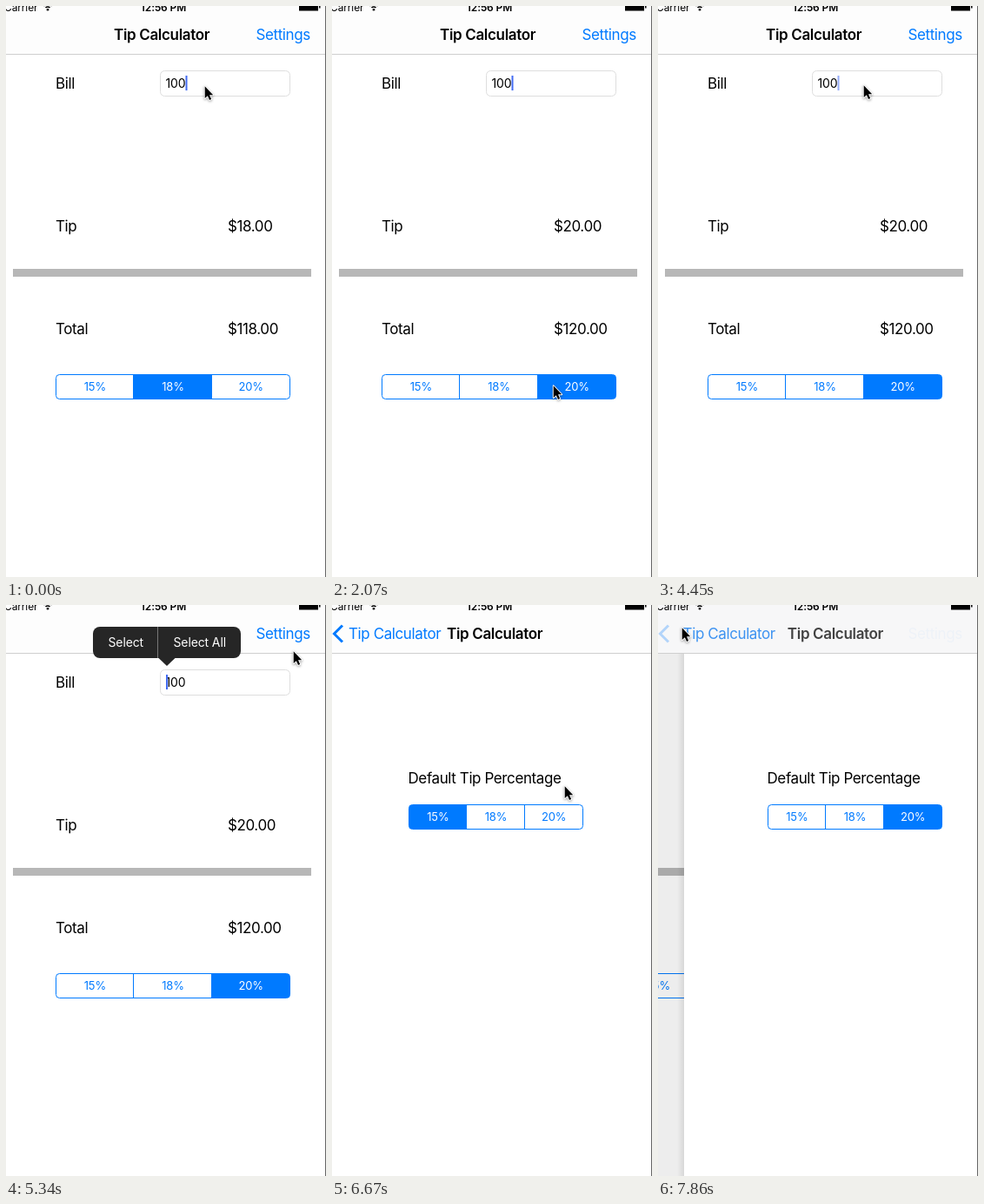
These frames come from a looping animation (368x656 px, 8 s). An HTML page with a canvas:

```html
<!DOCTYPE html>
<html lang="en">
<head>
<meta charset="utf-8">
<title>Tip Calculator</title>
<style>
html, body { margin: 0; width: 100%; height: 100%; overflow: hidden; background: #fff; }
canvas { display: block; width: 368px; height: 656px; }
</style>
</head>
<body>
<canvas></canvas>
<script>
const WIDTH = 368, HEIGHT = 656, LOOP = 8000;
const SCREEN_LEFT = -8, SCREEN_WIDTH = 375;
const TICK_START = 285, TICK = 148.3;
const BLUE = '#007aff';
const RATES = [15, 18, 20];

// Pointer path: [tick, x, y]
const POINTER = [
  [-1, 229, 92], [5, 106, 434], [7, 104, 435], [11, 255, 436], [14, 255, 436],
  [18, 322, 20], [19, 318, 37], [20, 318, 37], [22, 272, 83], [23, 272, 83],
  [25, 237, 91], [28, 237, 91], [29, 198, 91], [30, 163, 91], [32, 163, 91],
  [34, 331, 53], [35, 327, 40], [36, 326, 36], [40, 326, 36], [43, 268, 208],
  [45, 255, 240], [47, 69, 70], [49, 28, 26], [51, 28, 26]
];

const canvas = document.querySelector('canvas');
const ctx = canvas.getContext('2d');
const ratio = window.devicePixelRatio || 1;
canvas.width = WIDTH * ratio;
canvas.height = HEIGHT * ratio;

const clamp = v => Math.max(0, Math.min(1, v));

function rect(x, y, w, h, color) {
  ctx.fillStyle = color;
  ctx.fillRect(x, y, w, h);
}

function polyline(points) {
  ctx.beginPath();
  points.forEach(([x, y]) => ctx.lineTo(x, y));
}

function roundRect(x, y, w, h, r) {
  ctx.beginPath();
  ctx.roundRect(x, y, w, h, r);
}

function text(str, x, y, { size = 17, weight = 400, color = '#000', align = 'left', alpha = 1 } = {}) {
  ctx.save();
  ctx.globalAlpha *= alpha;
  ctx.font = `${weight} ${size}px Inter, Roboto, sans-serif`;
  ctx.letterSpacing = size < 17 ? '-0.12px' : weight > 400 ? '-0.33px' : '-0.4px';
  ctx.textAlign = align;
  ctx.fillStyle = color;
  ctx.fillText(str, x, y);
  ctx.restore();
}

function pointerAt(tick) {
  const i = POINTER.findIndex(p => p[0] >= tick);
  const [t1, x1, y1] = POINTER[i];
  if (i === 0) return [x1, y1];
  const [t0, x0, y0] = POINTER[i - 1];
  const f = (tick - t0) / (t1 - t0);
  return [x0 + (x1 - x0) * f, y0 + (y1 - y0) * f];
}

// How far the settings page still is from its place: 1 = away, 0 = covering.
function settingsDistance(time) {
  if (time < 5790) return 1;
  if (time < 7837.5) {
    const d = Math.exp(-(time - 5790) / 100);
    return d < 0.02 ? 0 : d;
  }
  return 1 - Math.exp(-(time - 7837.5) / 100);
}

function caretAt(tick, time) {
  const x = tick < 29 ? 206.5 : tick < 30 ? 199 : 184;
  if (tick >= 29) return { x, alpha: 1 };
  const phase = (time + 620) % 1000;
  const alpha = phase < 440 ? clamp(1 - phase / 130) : clamp((phase - 440) / 120);
  return { x, alpha };
}

function segments(x, y, w, selected) {
  const h = 28;
  const part = w / 3;
  const divider = i => Math.round(x + part * i) - 1;
  ctx.save();
  roundRect(x, y, w, h, 4);
  ctx.clip();
  rect(divider(selected), y, divider(selected + 1) + 1 - divider(selected), h, BLUE);
  for (const i of [1, 2]) rect(divider(i), y, 1, h, BLUE);
  ctx.restore();
  roundRect(x, y, w, h, 4);
  ctx.strokeStyle = BLUE;
  ctx.lineWidth = 1;
  ctx.stroke();
  RATES.forEach((rate, i) => text(`${rate}%`, x + part * (i + 0.5), y + 18.8,
    { size: 13, align: 'center', color: i === selected ? '#fff' : BLUE }));
}

function calculatorPage(selected, caret) {
  const tip = RATES[selected];
  text('Bill', 57, 95);
  roundRect(177.5, 74.5, 149, 29, 5);
  ctx.strokeStyle = '#dedede';
  ctx.lineWidth = 1;
  ctx.stroke();
  text('100', 183.5, 94, { size: 14 });
  ctx.globalAlpha = caret.alpha;
  rect(caret.x, 80, 2, 17, '#426bf2');
  ctx.globalAlpha = 1;
  text('Tip', 57, 259);
  text(`$${tip}.00`, 255, 259);
  rect(8, 302, 343, 9, '#b7b7b7');
  text('Total', 57, 377);
  text(`$${100 + tip}.00`, 255, 377);
  segments(57.5, 423.5, 269, selected);
}

function settingsPage(selected) {
  rect(SCREEN_LEFT, 0, SCREEN_WIDTH, HEIGHT, '#fff');
  text('Default Tip Percentage', 87.5, 205);
  segments(88.5, 229.5, 200, selected);
}

function pages(distance, mainSelected, settingsSelected, caret) {
  const covered = 1 - distance;
  const offset = Math.round(SCREEN_WIDTH * distance);
  if (distance > 0) {
    ctx.save();
    ctx.translate(Math.round(-0.3 * SCREEN_WIDTH * covered), 0);
    calculatorPage(mainSelected, caret);
    ctx.restore();
  }
  if (distance === 1) return;
  const edge = SCREEN_LEFT + offset;
  rect(0, 0, edge, HEIGHT, `rgba(0,0,0,${0.08 * covered})`);
  const shadow = ctx.createLinearGradient(edge - 8, 0, edge, 0);
  shadow.addColorStop(0, 'rgba(0,0,0,0)');
  shadow.addColorStop(1, 'rgba(0,0,0,.09)');
  rect(edge - 8, 0, 8, HEIGHT, shadow);
  ctx.save();
  ctx.translate(offset, 0);
  settingsPage(settingsSelected);
  ctx.restore();
}

function statusBar() {
  text('Carrier', -2, 5.5, { size: 12 });
  text('12:56 PM', 181, 5.5, { size: 12, weight: 600, align: 'center' });
  ctx.strokeStyle = '#000';
  ctx.lineWidth = 1.6;
  for (const r of [3.5, 6.5]) {
    ctx.beginPath();
    ctx.arc(48, 4.5, r, -Math.PI * 0.75, -Math.PI * 0.25);
    ctx.stroke();
  }
  ctx.beginPath();
  ctx.arc(48, 4.3, 1.3, 0, 7);
  ctx.fillStyle = '#000';
  ctx.fill();
  rect(337, -4, 22, 9.5, '#000');
  rect(360, -1, 1.5, 3.5, '#000');
}

function navigationBar(distance, tick) {
  const moving = distance > 0 && distance < 1;
  rect(0, 0, WIDTH, 55, moving ? '#f7f7f8' : '#fdfdfd');
  rect(0, 55, WIDTH, 1, '#cfcfcf');
  statusBar();
  const bold = { weight: 600 };
  if (distance === 1) {
    text('Tip Calculator', 124, 39, bold);
  } else {
    const root = Math.sqrt(distance);
    const press = tick === 50 ? 0.3 : 1;
    const fade = Math.exp(-0.95 * root);
    const backX = 19 + 166 * distance ** 1.25;
    text('Tip Calculator', backX, 39, { color: BLUE, alpha: fade * press });
    text('Tip Calculator', backX, 39, { alpha: 0.5 * distance });
    text('Tip Calculator', 132 + 515 * distance ** 1.5, 39, { ...bold, alpha: fade });
    ctx.globalAlpha = Math.exp(-4 * root) * press;
    polyline([[12, 23.5], [2.5, 33], [12, 42.5]]);
    ctx.strokeStyle = BLUE;
    ctx.lineWidth = 3;
    ctx.stroke();
    ctx.globalAlpha = 1;
  }
  const pressed = tick === 36 || tick === 37;
  const alpha = distance < 1 ? 0.4 * distance : pressed ? 0.3 : 1;
  text('Settings', 287.5, 39, { color: BLUE, alpha });
}

function loupe(x, selected, caret) {
  const y = 31, r = 62, zoom = 1.25;
  ctx.save();
  ctx.beginPath();
  ctx.arc(x, y, r, 0, 7);
  ctx.clip();
  rect(x - r, y - r, 2 * r, 2 * r, '#fff');
  ctx.translate(x, y);
  ctx.scale(zoom, zoom);
  ctx.translate(-x, -89);
  calculatorPage(selected, caret);
  ctx.restore();
  ctx.beginPath();
  ctx.arc(x, y, r, 0, 7);
  ctx.strokeStyle = '#a8a8a8';
  ctx.lineWidth = 2;
  ctx.stroke();
}

function editMenu() {
  roundRect(100, 25, 170, 36, 8);
  ctx.fillStyle = '#262626';
  ctx.fill();
  polyline([[175, 60.5], [195, 60.5], [185, 70]]);
  ctx.fill();
  rect(174, 25, 1, 36, '#777');
  const style = { size: 14, color: '#fff' };
  text('Select', 117.5, 48, style);
  text('Select All', 192.5, 48, style);
}

function pointer(x, y) {
  ctx.save();
  ctx.translate(x - 0.3, y + 0.3);
  ctx.scale(0.95, 0.95);
  polyline([[0, 0], [0, 14.5], [3.3, 11.5], [5.6, 16.5], [7.8, 15.5], [5.6, 10.6], [10, 10.6]]);
  ctx.closePath();
  ctx.lineJoin = 'round';
  ctx.lineWidth = 2;
  ctx.strokeStyle = '#fff';
  ctx.shadowColor = 'rgba(0,0,0,.4)';
  ctx.shadowBlur = 3 * ratio;
  ctx.shadowOffsetY = ratio;
  ctx.stroke();
  ctx.shadowColor = 'transparent';
  ctx.fillStyle = '#000';
  ctx.fill();
  ctx.restore();
}

function draw(now) {
  const tick = Math.floor((now % LOOP - TICK_START) / TICK);
  const step = Math.max(-1, Math.min(51, tick));
  const time = TICK_START + step * TICK;
  const distance = settingsDistance(time);
  const mainSelected = step < 6 ? 1 : step < 12 ? 0 : 2;
  const settingsSelected = step < 45 ? 0 : 2;
  const caret = caretAt(step, time);
  const [x, y] = pointerAt(step);

  ctx.setTransform(ratio, 0, 0, ratio, 0, 0);
  rect(0, 0, WIDTH, HEIGHT, '#fff');
  pages(distance, mainSelected, settingsSelected, caret);
  navigationBar(distance, step);
  if (step >= 29 && step < 33) loupe(x, mainSelected, caret);
  if (step >= 33 && step < 36) editMenu();
  rect(367, 0, 1, HEIGHT, '#666');
  pointer(x, y);
}

function frame() {
  draw(performance.now());
  requestAnimationFrame(frame);
}
frame();
</script>
</body>
</html>
```
